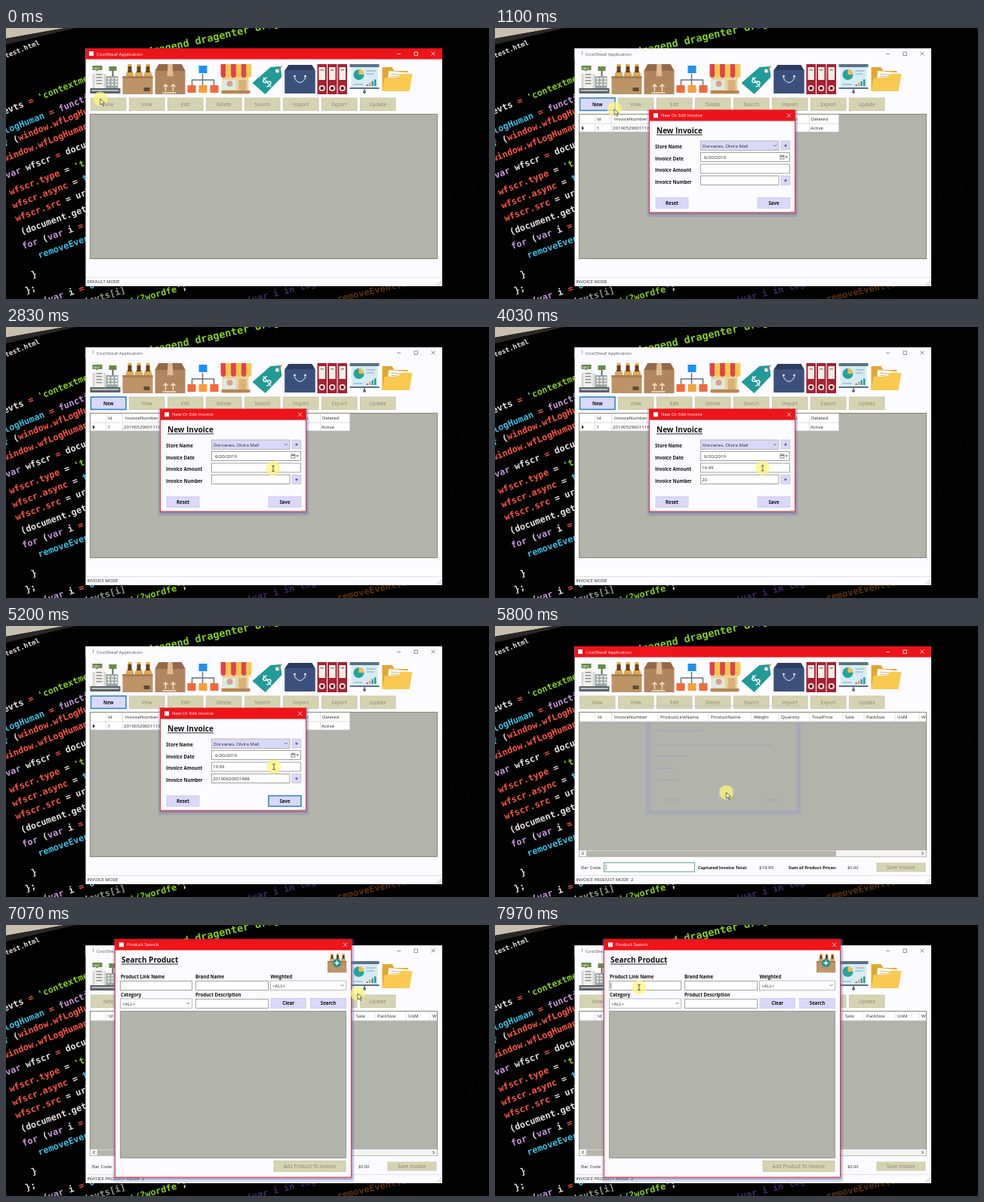
Animation, 640 px wide and 360 px high, one loop 8 s. Source, as an HTML page:

```html
<!DOCTYPE html>
<html lang="en">
<head>
<meta charset="utf-8">
<title>Invoice capture</title>
<style>
html, body { margin: 0; width: 100%; height: 100%; overflow: hidden; background: #000; }
svg { display: block; width: 100vw; height: 100vh; }
text { font-family: "Open Sans", "Noto Sans", sans-serif; white-space: pre; }
.code text { font-family: "DejaVu Sans Mono", "Noto Sans Mono", monospace; }
.timed { opacity: 0; animation: 8s step-end infinite; }
#pointer { animation: move 8s ease-in-out infinite; }
@keyframes move {
  0% { transform: translate(125px, 94px); }
  8%, 11.5% { transform: translate(135px, 100px); }
  21.25% { transform: translate(344px, 168px); }
  26%, 34% { transform: translate(354px, 188px); }
  65%, 68.5% { transform: translate(355px, 187px); }
  79.1%, 81% { transform: translate(192px, 301px); }
  88%, 89.5% { transform: translate(466px, 91px); }
  97%, 100% { transform: translate(191px, 83px); }
}
</style>
</head>
<body>
<svg id="stage" viewBox="0 0 640 360"></svg>
<script>
const LOOP = 8000;
const GRID = 300, INVOICE = 1000, SAVED = 5450, SEARCH = 6880;
const RED = '#ed141a', PAPER = '#fcfbff', LAVENDER = '#d9d8fa', GREY = '#b2b3aa', BLUE = '#2684bd';

const rect = (x, y, w, h, fill, more = '') =>
  `<rect x="${x}" y="${y}" width="${w}" height="${h}" fill="${fill}" ${more}/>`;
const path = (d, fill, more = '') => `<path d="${d}" fill="${fill}" ${more}/>`;
const line = (d, stroke, width = 1) => path(d, 'none', `stroke="${stroke}" stroke-width="${width}"`);
const disc = (x, y, r, fill) => `<circle cx="${x}" cy="${y}" r="${r}" fill="${fill}"/>`;
const text = (x, y, s, size = 6.1, fill = '#262626', more = '') =>
  `<text x="${x}" y="${y}" font-size="${size}" fill="${fill}" ${more}>${s.replace(/</g, '&lt;')}</text>`;
const bold = (x, y, s, size = 6.1) => text(x, y, s, size, '#111', 'font-weight="700"');
const group = (transform, body) => `<g transform="${transform}">${body}</g>`;
const repeat = (n, draw) => Array.from({ length: n }, (_, i) => draw(i)).join('');

// Wraps content so that it is shown only between two times of the loop.
let rules = '', ruleCount = 0;
function during(from, to, body) {
  const name = 'show' + ruleCount++;
  const pct = ms => (ms / LOOP * 100).toFixed(3) + '%';
  rules += `@keyframes ${name}{0%{opacity:${from ? 0 : 1}}` +
    (from ? `${pct(from)}{opacity:1}` : '') +
    (to < LOOP ? `${pct(to)}{opacity:0}` : '') + `100%{opacity:${to < LOOP ? 0 : 1}}}`;
  return `<g class="timed" style="animation-name:${name}">${body}</g>`;
}
const typed = (x, y, s, start, step, end) => repeat(s.length, i =>
  during(start + i * step, i + 1 < s.length ? start + (i + 1) * step : end, text(x, y, s.slice(0, i + 1))));

function button(x, y, w, h, label, state = 'on') {
  const off = state === 'off', focus = state === 'focus';
  const tx = x + w / 2, ty = y + h / 2 + 2.3, mid = 'text-anchor="middle"';
  return rect(x, y, w, h, off ? '#d6d4b0' : LAVENDER,
      `stroke="${focus ? BLUE : off ? '#c2c0a0' : '#cac9ea'}" stroke-width="${focus ? 1.5 : .8}"`) +
    (off ? text(tx + .6, ty + .6, label, 6.3, '#ecead0', mid) + text(tx, ty, label, 6.3, '#8f8e78', mid + ' font-weight="600"')
         : text(tx, ty, label, 6.1, '#111', mid + ' font-weight="700"'));
}
const field = (x, y, w, h, stroke = '#8d8d88', fill = '#fff') =>
  rect(x, y, w, h, fill, `stroke="${stroke}" stroke-width=".8"`);
const chevron = (x, y) => line(`M${x - 2} ${y - 1}l2 2 2-2`, '#555', .8);
const combo = (x, y, w, value, fill) =>
  field(x, y, w, 12.5, '#aaa', fill) + text(x + 2.5, y + 8.5, value) + chevron(x + w - 5, y + 6);
const cross = (x, y, color) => line(`M${x - 2.5} ${y - 2.5}l5 5m0-5l-5 5`, color, .8);

function background() {
  const colors = { r: '#ff5444', g: '#86cf22', w: '#e6e4e0', c: '#3fbfe6', p: '#c795dc', d: '#8f9a8a', n: '#3d2a66', b: '#5c3010' };
  const code = [
    [0, 40, -22, 9, 'wtest.html'],
    [180, 38, -12.5, 13.5, "g'dragend dragenter dragleave"],
    [-2, 115, -22, 11.8, "wevts |r= |g'contextmenu"],
    [-14, 146, -22, 11.8, 'cwflogHuman |r= |pfunction'],
    [-2, 158, -22, 11.8, 'cf |w(|rwindow.wfLogHuman'],
    [-2, 178, -22, 11.8, 'rwindow.wfLogHuman |w='],
    [1, 200, -21.5, 11.8, 'pvar |wwfscr |r= |wdocument'],
    [6, 222, -21.5, 11.8, "rwfscr.type |w= |g't"],
    [10, 240, -21, 11.8, 'rwfscr.async |w= |ctrue'],
    [14, 257, -20.5, 11.8, 'rwfscr.src |w= |wurl'],
    [21, 275, -20, 11.8, 'w(document.getElement'],
    [23, 294, -19.5, 11.8, 'pfor |w(|pvar |wi |r= '],
    [44, 306, -19.5, 11.8, 'cremoveEvent'],
    [35, 332, -19, 11.8, 'w}'],
    [27, 353, -19, 11.8, 'w};'],
    [37, 371, -18, 11.8, 'pr |w(|pvar |wi |r= |c0'],
    [98, 370, -17, 11.8, 'wt(|devts[i]'],
    [165, 367, -15, 11.8, "g'/?wordfe'|w;"],
    [320, 366, -14, 12, 'n(var i in logHuman)'],
    [440, 364, -13, 12, 'bremoveEvent(evts'],
  ];
  const lines = code.map(([x, y, angle, size, spec]) => {
    const spans = spec.split('|').map(s =>
      `<tspan fill="${colors[s[0]]}">${s.slice(1).replace(/</g, '&lt;')}</tspan>`).join('');
    return group(`translate(${x} ${y}) rotate(${angle})`,
      `<text font-size="${size}" font-weight="700">${spans}</text>`);
  }).join('');
  return rect(0, 0, 640, 360, '#020202') + path('M0 0H78L0 14z', '#c9bfae') +
    path('M0 14L78 0H92L0 22z', '#2a2826') + `<g class="code">${lines}</g>` +
    repeat(18, i => rect(582 + i * 37 % 50, 140 + i * 71 % 140, 1, 1, i % 3 ? '#35070b' : '#141440'));
}

const bottles = repeat(3, i => group(`translate(${5 + i * 12} 0)`,
    rect(2, 0, 5, 3, '#e3a92f') + path('M2 3h5v6l2 4v8H0v-8l2-4z', '#65401f') + rect(0, 11, 9, 5, '#e0a94a'))) +
  rect(0, 16, 40, 24, '#bd9468') + rect(0, 16, 40, 3, '#a67d55');

const icons = [
  rect(3, 2, 13, 6, '#668b46') + rect(25, 3, 10, 6, '#668b46') + rect(8, 8, 2, 7, '#666') + rect(29, 9, 2, 7, '#666') +
    rect(3, 13, 18, 19, '#d5d8d8') + rect(6, 9, 12, 23, '#f3f1e8') + repeat(4, i => rect(8, 13 + i * 4, 8, 1.5, '#8b9296')) +
    rect(21, 16, 16, 16, '#9aa5a5') + repeat(9, i => rect(23 + i % 3 * 5, 18 + (i / 3 | 0) * 4, 3, 2.5, '#f1f1df')) +
    rect(0, 32, 40, 7, '#596168') + rect(2, 34, 36, 2, '#b8c0bf') + text(4, 7, 'SALE', 4, '#fff'),
  bottles + rect(28, 31, 8, 5, '#624a32'),
  path('M5 0h30l5 9v31H0V9z', '#b08660') + path('M5 0h30l5 9H0z', '#94694a') + path('M17 0h6l1 16h-8z', '#dfbd92') +
    line('M14 36v-9m-3 3l3-3 3 3M24 36v-9m-3 3l3-3 3 3M10 38h18', '#f4e4cc', 1.4),
  line('M20 13v8M6 28v-7h29v7M20 21v7', '#69747b', 1.5) + rect(15, 2, 11, 10, '#1e91f0') +
    repeat(3, i => rect(i * 15, 28, 11, 10, ['#f2683c', '#f5a03b', '#f2683c'][i])),
  rect(3, 10, 35, 30, '#ecd29b') + repeat(6, i => path(`M${i * 6.8 + 1} 0h6.8v14a3.4 4 0 0 1-6.8 0z`, i % 2 ? '#f6c64d' : '#dc4548')) +
    rect(4, 21, 17, 13, '#d8ede5') + rect(25, 21, 10, 18, '#d9b27a') + disc(13, 26, 4, '#d8a08e') + rect(2, 35, 38, 4, '#b5855c'),
  path('M0 25L24 4l13-1 2 14L17 40z', '#219a98') + disc(33, 9, 2.5, '#fff') +
    line('M33 9q4-2 6-7', '#be8a55', 1.2) + group('rotate(-38 19 23)', text(13, 31, '$', 20, '#fff')),
  path('M5 1h31l4 7v31H0V8z', '#2c3c5e') + rect(0, 8, 40, 31, '#3b517c') +
    line('M13 17v2q7 11 14 0v-2', '#b4c6db', 1.3) + disc(13, 16, 1.3, '#fff') + disc(27, 16, 1.3, '#fff'),
  repeat(3, i => group(`translate(${i * 13.5} 0)`, rect(0, 0, 12.5, 40, '#a42234') + rect(2, 4, 8.5, 17, '#f7eee6') +
    rect(4, 7, 4.5, 1.5, '#888') + disc(6.2, 32, 4, '#f8e7df') + disc(6.2, 32, 2.2, '#571923'))),
  rect(0, 0, 39, 4, '#587184') + rect(2, 4, 35, 27, '#d7ebf4') + disc(12, 14, 7, '#25a39a') + path('M12 14V7a7 7 0 0 1 7 7z', '#f6bd49') +
    repeat(4, i => rect(22 + i * 3.5, 27 - i * 2.2, 2.4, 2 + i * 2.2, ['#de584c', '#e6a547', '#3498ba', '#239988'][i])) +
    line('M22 9h12m-12 4h10M5 27h12', '#7fa7b7', 1) + rect(0, 31, 39, 2, '#587184') + line('M19.5 33v3', '#587184', 1.5) + disc(19.5, 37, 2, '#587184'),
  path('M0 4h13l3 5h18v27H0z', '#e3a633') + group('rotate(5 20 15)', rect(8, 10, 26, 18, '#fff8e9') + line('M12 14h14m-14 3h10', '#c9b795')) +
    path('M3 18h18l4-5h15l-4 23H0z', '#f9c950'),
];

function titleBar(active) {
  const ink = active ? '#fff' : '#777';
  return rect(105.5, 27, 472.5, 14.5, active ? RED : PAPER) + rect(active ? 110 : 115, 31, active ? 6 : 1, active ? 6 : 5, active ? '#fff' : '#9ab') +
    text(120, 37, 'CostSheaf Application', 6, active ? '#fff' : '#555') +
    line('M518 34.5h5', ink, .8) + rect(541, 32, 4.5, 4.5, 'none', `stroke="${ink}" stroke-width=".8"`) + cross(566, 34, ink);
}

const headers = (cols, y = 123.3) => cols.map(([x, s]) => text(x, y, s)).join('');
const dividers = (xs, bottom) => line(xs.map(x => `M${x} 115V${bottom}`).join(''), '#cfcfd2', .6);

function invoiceGrid() {
  return rect(112, 115, 343.5, 23, '#fff') + line('M112 127h343.5M112 138h343.5', '#c8c8c8', .6) +
    dividers([132.5, 154.5, 216, 290, 340, 416.5, 455.5], 138) +
    headers([[135, 'Id'], [158, 'InvoiceNumber'], [219, 'StoreName'], [293, 'InvoiceDate'], [358, 'InvoiceAmount'], [419, 'Deleted']]) +
    path('M115 130.5l3 2.5-3 2.5z', '#222') +
    headers([[134.5, '1'], [156, '20190529001116'], [218, 'Dorvanes, Olvira Mall'], [293, '5/29/2019'], [358, '116.00'], [418, 'Active']], 135);
}

function productView() {
  const ghost = line('M203 128v120h199V128', '#9694cf', 6) + line('M201 106h203', '#aaa8dc', 1.5) +
    line('M216 139h58M216 158h150M216 173h38M216 189h20M216 204h28M226 231h18m115 0h16', '#9694cf', 2);
  return `<g opacity=".33">${ghost}</g>` +
    rect(112, 115, 459, 12, '#fff') + line('M112 127h459', '#c8c8c8', .6) +
    dividers([132.5, 154.5, 216, 283, 340, 376, 417, 461, 489, 530, 562], 127) +
    headers([[136, 'Id'], [158, 'InvoiceNumber'], [219, 'ProductLinkName'], [286, 'ProductName'], [343, 'Weight'], [379, 'Quantity'],
      [420, 'TotalPrice'], [464, 'Sale'], [492, 'PackSize'], [533, 'UoM'], [565, 'W']]) +
    rect(111.5, 298, 460, 8.5, '#f4f3f2') + rect(121, 298.5, 331, 7.5, '#b6b6ac') +
    line('M117.5 300l-2 2 2 2M565.5 300l2 2-2 2', '#444', 1) +
    text(114, 323, 'Bar Code') + field(144.5, 314.5, 120, 12, '#4a9a72') + line('M147 316.5v8', '#333', .6) +
    bold(269, 323, 'Captured Invoice Total:', 5.7) + text(350, 323, '$19.99') +
    bold(389, 323, 'Sum of Product Prices:', 5.7) + text(467, 323, '$0.00', 5.7) +
    button(506, 315, 64, 11, 'Save Invoice', 'off');
}

function mainWindow() {
  const names = ['New', 'View', 'Edit', 'Delete', 'Search', 'Import', 'Export', 'Update'];
  const status = s => text(107.5, 339.3, s, 5.8);
  return rect(105.5, 27, 472.5, 316, PAPER) +
    during(0, INVOICE, titleBar(true)) + during(INVOICE, SAVED, titleBar(false)) +
    during(SAVED, SEARCH, titleBar(true)) + during(SEARCH, LOOP, titleBar(false)) +
    icons.map((art, i) => group(`translate(${111.5 + i * 43} 48)`, art)).join('') +
    names.map((s, i) => button(112.5 + i * 51, 93, 46.5, 16.5, s, 'off')).join('') +
    during(GRID, SAVED, button(112.5, 93, 46.5, 16.5, 'New', 'focus')) +
    rect(111.5, 114.5, 460, 192, GREY, 'stroke="#77775a" stroke-width=".8"') +
    line('M106 331.5h472', '#d6d5da', .7) +
    repeat(6, i => rect(575 - [0, 2, 4, 0, 2, 0][i], 340 - [0, 0, 0, 2, 2, 4][i], 1, 1, '#aaa')) +
    during(0, GRID, status('DEFAULT MODE')) +
    during(GRID, SAVED, status('INVOICE MODE') + invoiceGrid()) +
    during(SAVED, LOOP, status('INVOICE PRODUCT MODE  2') + productView());
}

function dialogFrame(x, y, w, h, bar, title) {
  return rect(x - 3, y - 1, w + 7, h + 7, '#7774b8', 'opacity=".28" rx="3"') + rect(x - 1, y, w + 3, h + 3, '#67649c', 'opacity=".4" rx="2"') +
    rect(x, y, w, h, PAPER, `stroke="${RED}" stroke-width=".8"`) + rect(x, y, w, bar, RED) +
    rect(x + 5.5, y + bar / 2 - 3, 6, 6, '#fff') + text(x + 15.5, y + bar / 2 + 2.2, title, 6, '#fff') +
    cross(x + w - 8, y + bar / 2, '#fff');
}
const heading = (x, y, s, w) => bold(x, y, s, 10) + rect(x, y + 1.5, w, .9, '#111');

function invoiceDialog() {
  const labels = ['Store Name', 'Invoice Date', 'Invoice Amount', 'Invoice Number'];
  const plus = y => rect(379, y, 12, 12, LAVENDER, 'stroke="#bbb" stroke-width=".6"') + line(`M383.2 ${y + 6.2}h3.6m-1.8-1.8v3.6`, '#333', .8);
  return dialogFrame(204.5, 109, 193, 136, 14.5, 'New Or Edit Invoice') + heading(214, 140, 'New Invoice', 61) +
    labels.map((s, i) => bold(212, 160 + i * 15.6, s)).join('') +
    combo(272.5, 150, 103.5, 'Dorvanes, Olvira Mall', LAVENDER) + plus(150) +
    field(272.5, 165.5, 118, 12) + text(277, 174, '6/20/2019') +
    rect(378, 169, 5, 5, '#eef', 'stroke="#666" stroke-width=".7"') + line('M378 170.5h5', '#666') + path('M384.5 170.5h3.4l-1.7 2z', '#444') +
    field(272.5, 181, 118, 12) + field(272.5, 196.5, 103.5, 12) + plus(196.5) +
    during(1500, 2000, field(272.5, 181, 118, 12, '#9cbf72')) +
    typed(274, 189.3, '19.99', 3050, 150, SAVED) + typed(274, 204.7, '20190620001488', 3950, 75, SAVED) +
    button(213, 225.5, 43, 14, 'Reset') + button(348, 225.5, 43, 14, 'Save') +
    during(5030, SAVED, button(348, 225.5, 43, 14, 'Save', 'focus')) +
    repeat(3, i => rect(395 - i * 2, 243, 1, 1, '#aaa'));
}

function searchDialog() {
  return dialogFrame(144.5, 19, 313, 316, 14.5, 'Product Search') + heading(153, 50, 'Search Product', 75) +
    group('translate(426 38) scale(.63)', bottles) + disc(438.5, 50.5, 5.5, '#218f91') + line('M435.5 50.5h6m-3-3v6', '#fff', 1.4) +
    bold(152, 71, 'Product Link Name') + bold(251, 71, 'Brand Name') + bold(350.5, 71, 'Weighted') +
    field(151.5, 74.5, 95, 12) + field(251.5, 74.5, 96, 12) + combo(350.5, 74, 100, '<ALL>') +
    bold(152, 95, 'Category') + bold(251, 95, 'Product Description') +
    combo(151.5, 98, 95, '<ALL>') + field(251.5, 98.5, 96, 12) +
    button(351, 97.5, 46.5, 13, 'Clear') + button(403.5, 97.5, 47, 13, 'Search') +
    rect(151.5, 114.5, 299, 195, GREY, 'stroke="#8c8c80" stroke-width=".8"') +
    button(355, 313.5, 95, 14, 'Add Product To Invoice', 'off') +
    during(7800, LOOP, line('M153.5 76.5v8', '#222', .7));
}

function pointer() {
  const arrow = path('M0 0v8l2-1.6 1.5 3 1.2-.6-1.5-2.9H6z', '#fff', 'stroke="#222" stroke-width=".7"');
  const beam = line('M-1.8-3.5h3.6M0-3.5v7M-1.8 3.5h3.6', '#333', .8);
  return `<g id="pointer"><circle r="9.5" fill="#fdf67c" opacity=".75"/>` +
    during(0, 1980, arrow) + during(1980, SAVED, beam) + during(SAVED, 7650, arrow) + during(7650, LOOP, beam) + '</g>';
}

document.getElementById('stage').innerHTML = background() + mainWindow() +
  during(INVOICE, SAVED, invoiceDialog()) + during(SEARCH, LOOP, searchDialog()) + pointer();
document.head.appendChild(document.createElement('style')).textContent = rules;
</script>
</body>
</html>
```
